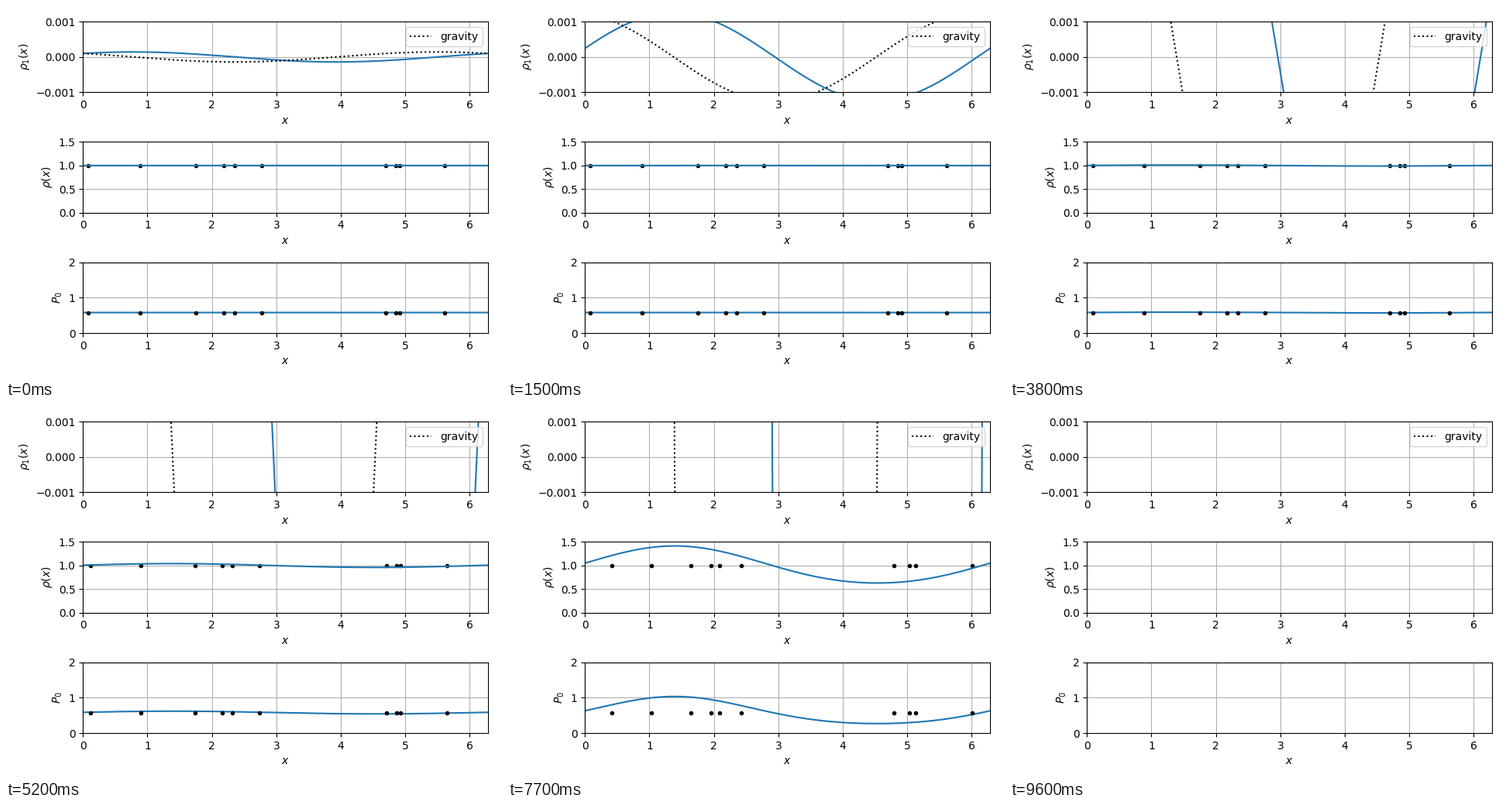
Recreate the animation shown at these times as a matplotlib script. Size 640 px wide and 480 px high, loop 9700 ms.

```python
import numpy as np
import matplotlib.pyplot as plt
from matplotlib.animation import FuncAnimation

# Self-gravitating gas in a periodic box, followed in Lagrangian coordinates
# with 4*pi*G = 1 and mean density 1. It is just beyond the Jeans limit.
FRAMES = 97
LAST_VALID = 95             # the solution breaks down after this frame
WIDTH, HEIGHT = 640, 480
BOX = 2 * np.pi
GAMMA = 5 / 3
SOUND2 = 0.9655
P0 = SOUND2 / GAMMA
EPS = 1e-4
VOID_FRAME, VOID_DENSITY = 85, 0.332   # ties frame numbers to physical time

CELLS = 300
DQ = BOX / CELLS
DT = 0.00125
STRIDE = 20                 # steps between stored states
Q = np.arange(CELLS) * DQ
TRACERS = np.array([0.084, 0.885, 1.752, 2.182, 2.352,
                    2.772, 4.697, 4.855, 4.915, 5.612])


def stretch(xi):
    return 1 + np.diff(xi, append=xi[0]) / DQ


def acceleration(xi):
    p = P0 * stretch(xi) ** -GAMMA
    return xi - xi.mean() - np.diff(p, prepend=p[-1]) / DQ


def simulate():
    """Return one displacement field per valid frame."""
    xi = EPS * (np.cos(Q) - np.sin(Q))
    vel = EPS * np.cos(Q + 0.03)
    acc = acceleration(xi)
    states = [xi.copy()]
    void_at, end = None, 3200
    while len(states) <= end:
        for _ in range(STRIDE):
            vel += 0.5 * DT * acc
            xi += DT * vel
            acc = acceleration(xi)
            vel += 0.5 * DT * acc
        states.append(xi.copy())
        if void_at is None and 1 / stretch(xi).max() <= VOID_DENSITY:
            void_at = len(states) - 1
            end = int(void_at * LAST_VALID / VOID_FRAME) + 1
    void_at = void_at or end * VOID_FRAME / LAST_VALID
    return [states[round(n * void_at / VOID_FRAME)]
            for n in range(LAST_VALID + 1)]


def sample(pos, values):
    """Interpolate a periodic field onto the plotting grid."""
    pos3 = np.concatenate([pos - BOX, pos, pos + BOX])
    return np.interp(x, pos3, np.tile(values, 3))


def make_panel(top, label, ylim, yticks):
    left, right, height = 99.3, 622.0, 91.3
    ax = fig.add_axes([left / WIDTH, 1 - (top + height) / HEIGHT,
                       (right - left) / WIDTH, height / HEIGHT])
    ax.set(xlim=(0, BOX), ylim=ylim, xticks=range(7), yticks=yticks,
           xlabel="$x$", ylabel=label)
    ax.grid(True)
    return ax


x = np.linspace(0, BOX, 201)
fields = simulate()

fig = plt.figure(figsize=(WIDTH / 100, HEIGHT / 100), dpi=100)
ax_pert = make_panel(20.1, r"$\rho_1(x)$", (-0.001, 0.001), [-0.001, 0, 0.001])
ax_rho = make_panel(175.4, r"$\rho(x)$", (0, 1.5), [0, 0.5, 1, 1.5])
ax_pres = make_panel(330.7, "$P_0$", (0, 2), [0, 1, 2])

pert_line, = ax_pert.plot([], [], "C0")
grav_line, = ax_pert.plot([], [], "k:", label="gravity")
ax_pert.legend(loc="upper right")
rho_dots, = ax_rho.plot([], [], "k.")
rho_line, = ax_rho.plot([], [], "C0")
pres_line, = ax_pres.plot([], [], "C0")
pres_dots, = ax_pres.plot([], [], "k.")
artists = [pert_line, grav_line, rho_dots, rho_line, pres_line, pres_dots]


def update(n):
    if n > LAST_VALID:
        for artist in artists:
            artist.set_data([], [])
        return artists
    xi = fields[n]
    nodes = Q + xi
    gaps = stretch(xi)
    rho = sample(nodes + 0.5 * DQ * gaps, 1 / gaps)
    pert_line.set_data(x, rho - 1)
    grav_line.set_data(x, sample(nodes, xi - xi.mean()))
    rho_line.set_data(x, rho)
    pres_line.set_data(x, P0 * rho ** GAMMA)
    spots = TRACERS + np.interp(TRACERS, Q, xi, period=BOX)
    rho_dots.set_data(spots, np.ones_like(spots))
    pres_dots.set_data(spots, np.full_like(spots, P0))
    return artists


anim = FuncAnimation(fig, update, frames=FRAMES, interval=100,
                     repeat=True, repeat_delay=0, blit=False)
plt.show()
```
